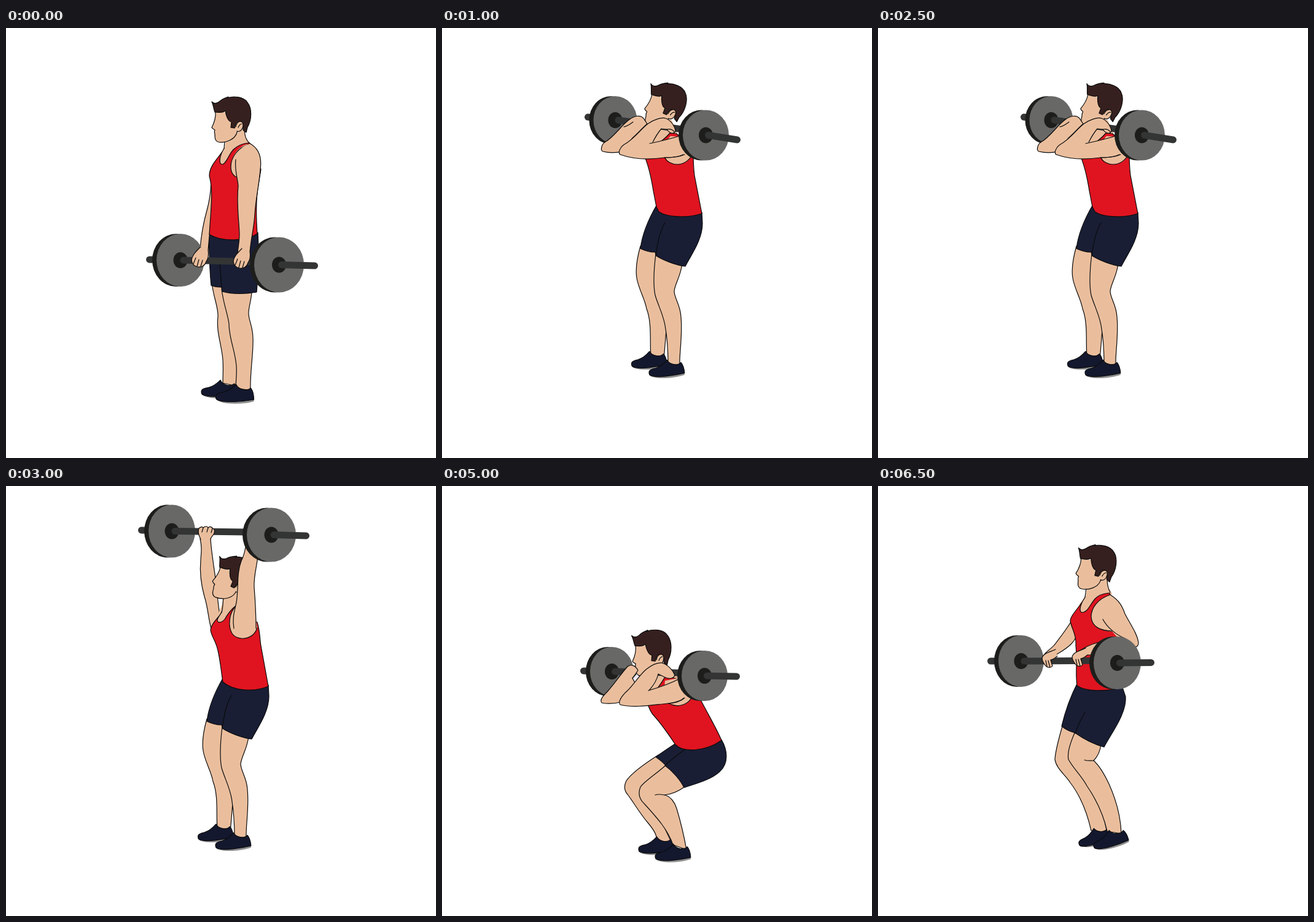
Recreate the animation shown at these times as an HTML page. Size 700 px wide and 700 px high, loop 7000 ms.

```html
<!DOCTYPE html>
<html lang="en">
<head>
<meta charset="utf-8">
<title>Barbell clean and press</title>
<style>
html, body { margin: 0; width: 100%; height: 100%; overflow: hidden; background: #fff; }
svg { display: block; width: 100vw; height: 100vh; }
.line { stroke: #0b0b0b; stroke-width: 1.2; stroke-linecap: round; stroke-linejoin: round; }
.bar { stroke: #333434; stroke-width: 11; stroke-linecap: round; }
</style>
</head>
<body>
<svg id="stage" viewBox="0 0 700 700"></svg>
<script>
const SKIN = '#eabe9d', RED = '#e01420', NAVY = '#191e35', HAIR = '#36201f';
const SHOE = '#13182e', SOLE = '#8f8f90', PLATE = '#686867', DARK = '#1d1e1b';

const shape = (fill, d) => `<path class="line" fill="${fill}" d="${d}"/>`;
const flat = (fill, d) => `<path fill="${fill}" d="${d}"/>`;
const skin = d => shape(SKIN, d);
const bare = d => flat(SKIN, d);
const red = d => shape(RED, d);
const navy = d => shape(NAVY, d);
const ink = d => shape('none', d);
const oval = (fill, x, y, rx, ry) => `<ellipse fill="${fill}" cx="${x}" cy="${y}" rx="${rx}" ry="${ry}"/>`;
const rod = (x1, y1, x2, y2) => `<line class="bar" x1="${x1}" y1="${y1}" x2="${x2}" y2="${y2}"/>`;
const place = (x, y, turn, size, body) =>
  `<g transform="translate(${x} ${y}) rotate(${turn}) scale(${size})">${body}</g>`;

const disc = ([x, y, rx, ry]) =>
  oval(DARK, x - 7, y, rx, ry) + oval(PLATE, x, y, rx, ry) + oval(DARK, x, y, 11.5, 13);

// Far half sits behind the hands, near half in front of the body.
const farBar = (end, left, right) =>
  rod(end[0] + 5.5, end[1], left[0], left[1]) + disc(left) + rod(left[0] + 5, left[1], right[0], right[1] - 4);
const nearBar = (right, end) => disc(right) + rod(right[0] + 4, right[1], end[0] - 5.5, end[1]);

const head = (x, y, turn) => place(x, y, turn, 1,
  skin('M-38 -24C-37 -14 -40 -6 -44 2C-43 4 -41 5 -39 6C-41 10 -38 13 -39 16C-39 21 -38 25 -32 26C-20 27 -6 21 -3 10L8 -20') +
  shape(HAIR, 'M-44 -40C-40 -36 -36 -37 -32 -40C-28 -44 -23 -46 -17 -48L-19 -46C-8 -50 8 -48 14 -39C22 -29 21 -10 14 2L12 10L7 6C7 0 7 -7 1 -8C-3 -8 -5 -5 -7 3L-13 2L-12 -7C-17 -8 -20 -14 -22 -25C-28 -21 -34 -23 -39 -23C-41 -28 -41 -34 -44 -40Z') +
  skin('M-5 1C-3 -9 6 -11 7 -3C7 5 2 10 -3 8') + ink('M-1 2C1 -3 3 -4 5 -4'));

const shoe = (x, y, turn, size) => place(x, y, turn, size,
  flat(SOLE, 'M0 1C8 10 45 6 62 4V8C45 13 8 14 0 4Z') +
  shape(SHOE, 'M0 0C0 -5 6 -6 12 -7C21 -9 28 -15 33 -20C37 -11 51 -8 57 -14C60 -10 62 -4 62 5C45 8 12 11 2 5C0 4 0 2 0 0Z'));

const fist = (x, y) => place(x, y, 0, 1,
  skin('M14 0C8 6 1 13 0 21C1 28 5 31 10 32C16 33 22 30 24 23C28 18 28 11 27 4') +
  ink('M3 27L7 17M9 31L12 20M15 31L18 21'));

const grip = (x, y) => place(x, y, 0, 1,
  skin('M22 -3C14 1 2 3 0 11C0 16 2 18 4 21C7 27 14 28 17 24L14 14C18 14 21 11 25 8') +
  ink('M8 24L6 15M13 26L10 15'));

function stand() {
  const left = [284, 378, 39, 43], right = [444.5, 385.5, 40.5, 45];
  return skin('M335 415C338 440 346 455 345 470C342 495 351 515 353 540C354 555 353 565 353 578L376 583L378 500L354 415') +
    shoe(318, 592, 0, .94) +
    skin('M351 425C354 450 361 465 363 482C363 505 373 525 375 550C376 565 374 575 374 586L398 590C397 560 403 530 402 505C402 485 394 475 395 462C396 450 400 440 400 428') +
    shoe(341.5, 600, 0, 1) +
    navy('M330 334C331 365 331 390 334 419C340 422 346 422 351 422L352 429C370 434 390 433 408 430C411 400 412 365 410 333Z') +
    ink('M348 382C349 395 350 410 351 423') +
    skin('M316 359C318 335 321 318 327 297C333 275 335 255 333 235L342 240L336 285C333 315 331 340 329 362') +
    bare('M358 180L356 194L345 212L347 230H380L398 188L389 178V164Z') +
    ink('M356 184L355 196M388 166C389 177 391 183 397 188') +
    red('M355 196C348 211 331 222 331 241C338 265 333 300 331 336C350 348 390 348 409 335C407 305 407 275 411 255L415 230L398 189L395 187C385 188 376 192 370 198C362 207 358 222 352 222C346 222 347 209 355 196Z') +
    bare('M392 189C377 194 366 210 366 226C366 237 372 242 378 244L398 238Z') +
    ink('M395 189C378 195 366 210 366 226C366 237 372 242 378 244') +
    farBar([228, 377], left, right) +
    bare('M372 225C375 200 386 190 397 189L412 225Z') +
    skin('M374 214C372 232 377 244 378 257C375 285 379 310 380 335C380 348 378 355 377 366L397 367C398 345 404 325 405 303C407 275 412 255 414 230C417 208 410 195 397 188') +
    fist(302, 357) + fist(370, 359) +
    head(379, 160, 0) + nearBar(right, [508, 387]);
}

function pull() {
  const left = [233, 285, 37, 42], right = [389.5, 288, 38.5, 43];
  return skin('M301 388C293 415 289 430 288 445C290 460 305 470 313 483C330 505 340 530 347 561L373 565C368 535 358 510 340 480L324 400') +
    shoe(327, 582, -14, .9) +
    skin('M321 400C312 420 308 435 310 445C318 460 330 470 340 488C355 510 367 535 373 562L396 566C395 535 385 505 376 485C368 468 360 455 351 447C358 440 362 430 363 420') +
    ink('M336 446C342 448 346 447 351 447') +
    shoe(351, 586, -14, .93) +
    navy('M325 320C312 345 304 370 299 391C306 397 314 400 321 402C335 412 350 420 368 425C380 402 405 370 403 343L396 322Z') +
    ink('M337 368C329 382 324 393 321 403') +
    skin('M268 280C270 270 284 265 290 255C300 242 307 233 316 218L324 240C321 258 300 268 288 276') +
    bare('M341 164L338 180L328 192L326 212H362L381 175L374 164V148Z') +
    ink('M339 167L337 181M373 150C373 162 375 168 378 173') +
    red('M337 181C329 197 313 210 313 220C316 234 323 242 322 260C325 285 321 305 324 325C338 335 370 335 396 328L392 240L377 174C366 175 358 178 353 184C344 195 341 205 333 206C326 206 329 193 337 181Z') +
    farBar([178, 285], left, right) +
    bare('M378 177C357 184 347 199 347 213C348 229 362 237 386 237L402 208Z') +
    ink('M378 177C357 184 347 199 347 213C348 229 362 237 386 236') +
    skin('M320 275C332 264 348 257 361 254L400 246L420 262L395 275L341 275') +
    bare('M366 217L378 177C394 187 398 197 402 208C410 224 422 240 424 255C424 260 422 262 418 262L402 260L384 240Z') +
    ink('M378 177C394 187 398 197 402 208C410 224 422 240 424 255C424 260 422 262 418 262M366 217C373 230 387 242 402 248') +
    grip(267, 269) + grip(316, 267) +
    head(366, 145, 6) + nearBar(right, [450, 287.5]);
}

const bentLegs = () =>
  skin('M323 355C316 380 315 395 317 407C320 425 330 440 333 457C342 480 338 510 340 536L361 541L366 480L350 360') +
  shoe(308.5, 547, -4, .93) +
  skin('M348 368C344 400 344 420 347 435C353 455 362 470 364 490C368 515 368 530 368 548L387 550C386 530 392 500 389 470C388 450 378 440 378 428C380 415 388 405 391 384') +
  shoe(337, 561, -4, .93) +
  navy('M349 289C338 308 326 335 323 359C331 363 340 365 347 365L349 371C360 378 380 386 396 388C405 370 424 345 424 318L423 300Z') +
  ink('M363 317C354 332 351 350 348 370');

function rack() {
  const left = [282, 150, 35.5, 39], right = [429.5, 174.5, 37.5, 41];
  return bentLegs() +
    bare('M345 145L335 205H405L385 176L374 150Z') +
    red('M328 205C336 222 340 240 344 265L349 291L353 299C365 308 400 310 423 302L411 240C409 225 409 215 409 200L382 172L371 171C365 178 355 186 348 190Z') +
    bare('M372 176C363 185 360 205 364 212C372 226 396 226 407 208L400 178Z') +
    ink('M362 210C370 226 395 227 407 207') +
    farBar([232, 145], left, right) + head(373, 140, 14) +
    skin('M262 201C257 200 260 189 265 186C281 177 291 159 305 149C313 143 323 141 328 147L334 156C325 164 316 174 310 179L294 201C280 204 270 203 262 201Z') +
    ink('M296 161C302 160 307 156 311 153') +
    skin('M395 206C386 210 374 211 362 211C335 215 310 213 290 206C286 203 290 194 296 190C314 180 323 165 335 156C345 149 357 145 364 147C372 150 379 159 380 168C377 174 370 171 366 165L357 164C352 170 347 178 343 186') +
    bare('M343 186C360 183 374 180 388 176L404 190L392 207L345 210Z') +
    ink('M338 188C358 184 373 180 390 175M393 206C385 210 374 211 362 211M366 165C372 164 376 166 378 169') +
    nearBar(right, [486, 182]);
}

function squat() {
  const left = [276.5, 302, 35.5, 40], right = [427.5, 309, 37.5, 41];
  return skin('M352 438C330 452 308 468 300 480C296 488 296 495 302 502C312 515 322 533 335 548C345 560 350 568 350 579L374 581L345 520L368 452') +
    shoe(320, 591, -3, .93) +
    navy('M382 418C368 427 358 434 348 441C355 446 361 450 365 456L400 432Z') +
    skin('M366 453C350 468 330 480 323 490C319 500 321 510 330 518C350 540 368 560 376 584L398 592C394 570 388 545 382 525C379 515 372 505 362 503C375 502 385 497 396 489') +
    ink('M347 503C352 501 357 502 362 503') +
    shoe(347, 603, -3, .93) +
    navy('M394 430C380 440 369 449 363 455C374 463 388 478 394 491C415 484 438 478 452 465C467 452 465 430 455 413Z') +
    bare('M322 295L338 352L400 350L385 310L365 290Z') +
    red('M334 352C338 365 341 370 345 374C357 387 370 406 380 421C392 434 428 433 455 414C447 395 435 375 422 350L388 314L363 311C358 319 354 326 349 331Z') +
    bare('M363 317L361 345C372 361 398 362 406 345L388 312Z') +
    ink('M370 354C380 360 398 359 406 345') +
    farBar([225, 301], left, right) +
    flat('#ece8f4', 'M306 318L313 304L327 306L317 319Z') +
    head(354, 282, -2) +
    skin('M260 353C256 348 263 341 269 335C283 319 292 305 302 294C307 290 314 291 319 300C316 305 313 309 310 313L314 320L294 351C280 355 270 355 260 353Z') +
    ink('M310 313L316 306') +
    skin('M395 345C388 351 380 353 368 354C345 356 315 362 290 356C286 352 292 342 302 333C313 322 322 307 333 298C342 291 351 287 358 288C368 291 376 300 379 308C376 315 368 314 362 311L352 306C350 317 343 326 337 333') +
    bare('M337 333L386 315L404 330L394 346L340 352Z') +
    ink('M336 333C353 328 371 322 386 314M368 354C379 353 388 351 394 345') +
    nearBar(right, [485, 310]);
}

function press() {
  const left = [270, 73.5, 38, 43], right = [432, 79.5, 40, 44];
  return place(4, 24, 0, 1, bentLegs()) +
    skin('M316 86C319 98 318 108 317 120C315 142 318 162 323 180C329 198 329 215 334 232L348 212C346 195 343 172 341 150C337 122 334 104 333 86') +
    bare('M354 174L352 192L342 216L348 226H368L378 195L377 168Z') +
    ink('M354 180C353 191 353 200 351 206') +
    red('M351 205C347 215 335 221 333 234C334 245 342 252 345 268C349 285 350 300 353 319C370 334 405 336 427 326L415 260C413 250 414 238 409 222L374 195C366 201 360 210 356 217C352 222 345 224 344 219C344 214 349 210 351 205Z') +
    bare('M374 196C363 206 361 228 368 240C377 253 402 251 409 231L404 190Z') +
    ink('M374 196C363 206 361 228 368 240C377 253 402 251 409 231') +
    farBar([215, 72], left, right) +
    head(379, 165, 16) +
    skin('M371 232C368 216 372 203 375 190C379 165 375 143 383 122C388 112 390 102 391 92L410 112C409 130 403 145 404 165C406 190 407 210 407 232') +
    bare('M371.6 231L406.4 231L402 241H376Z') +
    skin('M317 87C315 82 311 76 314 69C317 66 320 66 321 68C324 65 328 65 329 68C332 65 336 67 336 69C341 70 340 77 337 80C335 83 333 84 333 87') +
    ink('M321 68L319 75M329 68L327 75M336 69L334 76') +
    nearBar(right, [494, 81]);
}

const poses = { stand, pull, rack, squat, press };
const steps = [
  [0, 'stand'], [500, 'pull'], [1000, 'rack'], [1500, 'squat'], [2500, 'rack'], [3000, 'press'],
  [4500, 'rack'], [5000, 'squat'], [6000, 'rack'], [6500, 'pull']
];
const LOOP = 7000;

const stage = document.getElementById('stage');
stage.innerHTML = Object.entries(poses)
  .map(([name, draw]) => `<g id="${name}" display="none">${draw()}</g>`).join('');

let shown;
function show(time) {
  const name = steps.filter(([from]) => from <= time).pop()[1];
  if (name === shown) return;
  for (const group of stage.children)
    group.setAttribute('display', group.id === name ? 'inline' : 'none');
  shown = name;
}

const start = performance.now();
function tick() {
  show((performance.now() - start) % LOOP);
  requestAnimationFrame(tick);
}
show(0);
requestAnimationFrame(tick);
</script>
</body>
</html>
```
